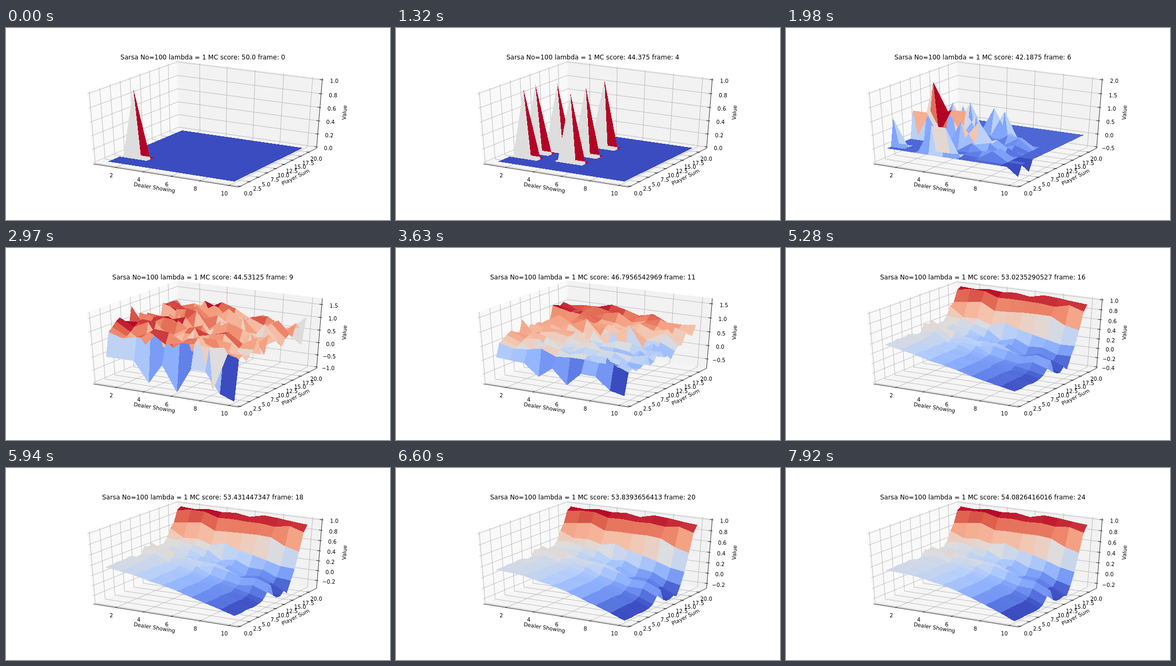
These frames come from a looping animation (720 px wide and 360 px high, 8 s). An HTML page:

```html
<!DOCTYPE html>
<html lang="en">
<head>
<meta charset="utf-8">
<title>Value surface</title>
<style>
  html, body { margin: 0; width: 100%; height: 100%; overflow: hidden; background: #fff; }
  svg { display: block; width: 720px; height: 360px; font: 10px "DejaVu Sans", sans-serif; }
  text { text-anchor: middle; fill: #000; }
  .title { font-size: 12px; }
  .grid { fill: none; stroke: #b0b0b0; stroke-width: .8; }
  .axis { fill: none; stroke: #000; stroke-width: .8; }
  .surface { shape-rendering: crispEdges; }
</style>
</head>
<body>
<svg id="stage" viewBox="0 0 720 360"></svg>
<script>
const STEP = 330, LOOP = 8000, COLS = 10, ROWS = 21;
const EDGE = 0.5 + 1 / 48;      // half size of the drawn box
const TICK_PAD = 0.0554, LABEL_PAD = 0.1205;

const lerp = (a, b, k) => a + (b - a) * k;
const clamp = (v, lo = 0, hi = 1) => Math.min(hi, Math.max(lo, v));
const easeInOut = k => (1 - Math.cos(Math.PI * k)) / 2;
const noise = (x, y, seed) => {
  const s = Math.sin(x * 127.1 + y * 311.7 + seed * 74.7) * 43758.5453;
  return 2 * (s - Math.floor(s)) - 1;
};

// rule(x, y, t) gives the height, t runs from 0 to 1 along x; points are single outliers
const makeField = (rule, points = []) => {
  const field = Array.from({ length: COLS }, (_, i) =>
    Array.from({ length: ROWS }, (_, j) => rule(i + 1, j + 1, i / (COLS - 1))));
  for (const [x, y, z] of points) field[x - 1][y - 1] = z;
  return field;
};

const flat = () => 0;
const first = [2, 5, 1];
const visits = Array.from({ length: 14 }, (_, i) =>
  [Math.round(5 + 3 * noise(i, 1, 1)), Math.round(11 + 6 * noise(i, 2, 1)), 1]);

const scattered = (x, y) =>
  x > 2 && x < 9 && y > 2 && y < 13 ? .4 * Math.max(0, noise(x, y, 2)) : 0;

const rough = (x, y, t) => y === 1 ? 0 : .85 - .15 * t + .45 * noise(x, y, 3);

const settling = (x, y, t) =>
  lerp(.18 - .4 * t ** .8, .98, clamp((y - 2 - 14 * t) / (17 - 12 * t))) +
  noise(x, y, 6) * .24 * clamp((y - 2) / 9) * clamp((ROWS + 1 - y) / 3);

// a slope towards the dealer's ten, a small ridge and a steep rise to 21
const learned = (start, drop, power, jitter) => (x, y, t) => {
  const ridge = (.1 + .13 * t) * Math.exp(-(((y - 12 + 1.3 * t) / 1.3) ** 2));
  const low = start - drop * t ** power + ridge;
  const wobble = jitter * noise(x, y, 5) * lerp(.15, 1, clamp((y - 6) / 5));
  const crest = .96 + .04 * noise(x, 1, 8);
  return lerp(low, crest, easeInOut(clamp((y - 16) / 5))) + (y < ROWS ? wobble : 0);
};

const STAGES = [
  { at: 0, score: 50, lo: 0, hi: 1, field: makeField(flat, [first]) },
  { at: 2, score: 47.5, lo: 0, hi: 1, field: makeField(flat, [first]) },
  { at: 4, score: 44.375, lo: 0, hi: 1, field: makeField(flat, [first, ...visits.slice(0, 5)]) },
  { at: 6, score: 42.1875, lo: -.5, hi: 2, field: makeField(scattered, [...visits,
    [2, 10, 2], [3, 10, 1], [4, 2, 1], [5, 2, 1], [1, 3, 1], [1, 8, 1], [10, 2, -.4], [10, 5, -.4]]) },
  { at: 9, score: 44.53125, lo: -1, hi: 1.68, field: makeField(rough,
    [[1, 8, 1.55], [4, 1, -.8], [6, 1, -1], [8, 3, -.9], [9, 1, -.8], [10, 1, -1], [10, 20, 0]]) },
  { at: 13, score: 49.0600585938, lo: -.61, hi: 1.6, field: makeField(settling, [[7, 14, 1.6], [10, 21, .5]]) },
  { at: 16, score: 53.0235290527, lo: -.4, hi: 1, field: makeField(learned(.38, .58, 1, .09)) },
  { at: 20, score: 53.8393656413, lo: -.27, hi: 1, field: makeField(learned(.34, .6, 1.7, .06)) },
  { at: 24, score: 54.0826416016, lo: -.27, hi: 1, field: makeField(learned(.33, .6, 1.9, .055)) }
];

const stateAt = n => {
  const i = Math.max(1, STAGES.findIndex(s => s.at >= n));
  const a = STAGES[i - 1], b = STAGES[i];
  const k = (n - a.at) / (b.at - a.at);
  const lo = lerp(a.lo, b.lo, k), hi = lerp(a.hi, b.hi, k);
  const field = a.field.map((col, x) => col.map((z, y) => clamp(lerp(z, b.field[x][y], k), lo, hi)));
  return { lo, hi, field, score: lerp(a.score, b.score, k) };
};

// each step of the running average adds a decimal
const scoreText = (score, n) => {
  const text = String(Number(score.toFixed(clamp(n - 1, 1, 10))));
  return text.includes('.') ? text : text + '.0';
};

// camera at azimuth -60, elevation 30, ten units away
const project = ([u, v, w]) => {
  const depth = 10 - (.433 * u - .75 * v + .5 * w);
  return [376.5 + 3016.2 * (.866 * u + .5 * v) / depth,
    175.4 - 1469.2 * (-.25 * u + .433 * v + .866 * w) / depth, depth];
};
const unitX = x => (x - .55) / 9.9 - .5;
const unitY = y => y / 22 - .5;

const coords = points => points.map(p => project(p).slice(0, 2).map(c => c.toFixed(2)).join()).join(' ');
const line = (cls, ...points) => `<polyline class="${cls}" points="${coords(points)}"/>`;
const pane = (color, ...points) => `<polygon fill="${color}" points="${coords(points)}"/>`;

const tickLabel = (point, label) => {
  const [x, y] = project(point);
  return `<text x="${x.toFixed(2)}" y="${(y + 7.6).toFixed(2)}">${label}</text>`;
};
const axisLabel = (point, from, to, label) => {
  const [x, y] = project(point), a = project(from), b = project(to);
  const angle = Math.atan2(b[1] - a[1], b[0] - a[0]) * 180 / Math.PI;
  return `<text transform="translate(${x.toFixed(2)} ${y.toFixed(2)}) rotate(${angle.toFixed(2)})" y="2.7">${label}</text>`;
};

const E = EDGE, T = E + TICK_PAD, L = E + LABEL_PAD, OUT = E + .1 / 12, IN = E - .2 / 12;

const xTick = x => {
  const u = unitX(x);
  return line('grid', [u, -E, -E], [u, E, -E], [u, E, E]) +
    line('axis', [u, -OUT, -E], [u, -IN, -E]) + tickLabel([u, -T, -T], x);
};
const yTick = y => {
  const v = unitY(y);
  return line('grid', [E, v, -E], [-E, v, -E], [-E, v, E]) +
    line('axis', [OUT, v, -E], [IN, v, -E]) + tickLabel([T, v, -T], y.toFixed(1));
};
const zTick = (w, label) =>
  line('grid', [-E, -E, w], [-E, E, w], [E, E, w]) +
  line('axis', [OUT, E, w], [IN, E, w]) + tickLabel([T, T, w], label);

const BOX =
  pane('#f9f9f9', [-E, -E, -E], [-E, E, -E], [-E, E, E], [-E, -E, E]) +
  pane('#f2f2f2', [-E, E, -E], [E, E, -E], [E, E, E], [-E, E, E]) +
  pane('#f5f5f5', [-E, -E, -E], [E, -E, -E], [E, E, -E], [-E, E, -E]) +
  Array.from({ length: 5 }, (_, i) => xTick(2 * i + 2)).join('') +
  Array.from({ length: 9 }, (_, i) => yTick(2.5 * i)).join('') +
  line('axis', [-E, -E, -E], [E, -E, -E], [E, E, -E], [E, E, E]) +
  axisLabel([0, -L, -L], [-E, -E, -E], [E, -E, -E], 'Dealer Showing') +
  axisLabel([L, 0, -L], [E, -E, -E], [E, E, -E], 'Player Sum') +
  axisLabel([L, L, 0], [E, E, -E], [E, E, E], 'Value');

const zAxis = (lo, hi) => {
  const step = [.2, .25, .5].find(s => (hi - lo) / s <= 9) || .5;
  let out = '';
  for (let k = Math.ceil(lo / step - .01); k * step <= hi + .001; k++) {
    const label = Math.abs(k * step).toFixed(step === .25 ? 2 : 1);
    out += zTick((k * step - lo) / (hi - lo) - .5, (k < 0 ? '\u2212' : '') + label);
  }
  return out;
};

// cool to warm
const PALETTE = ['#3b4cc0', '#6282ea', '#8db0fe', '#b8d0f9', '#dddddd', '#f5c4ad', '#f49a7b', '#de604d', '#b40426'];
const channel = (hex, i) => parseInt(hex.substr(1 + 2 * i, 2), 16);
const warmth = k => {
  const s = clamp(k) * 8, i = Math.min(7, Math.floor(s));
  const rgb = [0, 1, 2].map(c => Math.round(lerp(channel(PALETTE[i], c), channel(PALETTE[i + 1], c), s - i)));
  return `rgb(${rgb})`;
};

// faces are closed loops, so the first corner counts twice in colour and depth
const loopMean = values => (values[0] + values.reduce((sum, v) => sum + v, 0)) / (values.length + 1);

const surface = ({ field, lo, hi }) => {
  const faces = [];
  for (let i = 0; i < COLS - 1; i++) {
    for (let j = 0; j < ROWS - 1; j++) {
      const corners = [[i, j], [i, j + 1], [i + 1, j + 1], [i + 1, j]];
      const points = corners.map(([a, b]) =>
        [unitX(a + 1), unitY(b + 1), (field[a][b] - lo) / (hi - lo) - .5]);
      faces.push({
        points,
        mean: loopMean(corners.map(([a, b]) => field[a][b])),
        depth: loopMean(points.map(p => project(p)[2]))
      });
    }
  }
  const means = faces.map(f => f.mean);
  const min = Math.min(...means), span = Math.max(...means) - min;
  return faces.sort((a, b) => b.depth - a.depth)
    .map(f => pane(warmth((f.mean - min) / span), ...f.points)).join('');
};

const stage = document.getElementById('stage');
const draw = n => {
  const state = stateAt(n);
  stage.innerHTML = BOX + zAxis(state.lo, state.hi) +
    `<g class="surface">${surface(state)}</g>` +
    `<text class="title" x="369" y="59">Sarsa No=100 lambda = 1 MC score: ${scoreText(state.score, n)} frame: ${n}</text>`;
};

let shown = -1;
const start = performance.now();
const play = () => {
  const n = Math.floor((performance.now() - start) % LOOP / STEP);
  if (n !== shown) draw(shown = n);
  requestAnimationFrame(play);
};
play();
</script>
</body>
</html>
```
